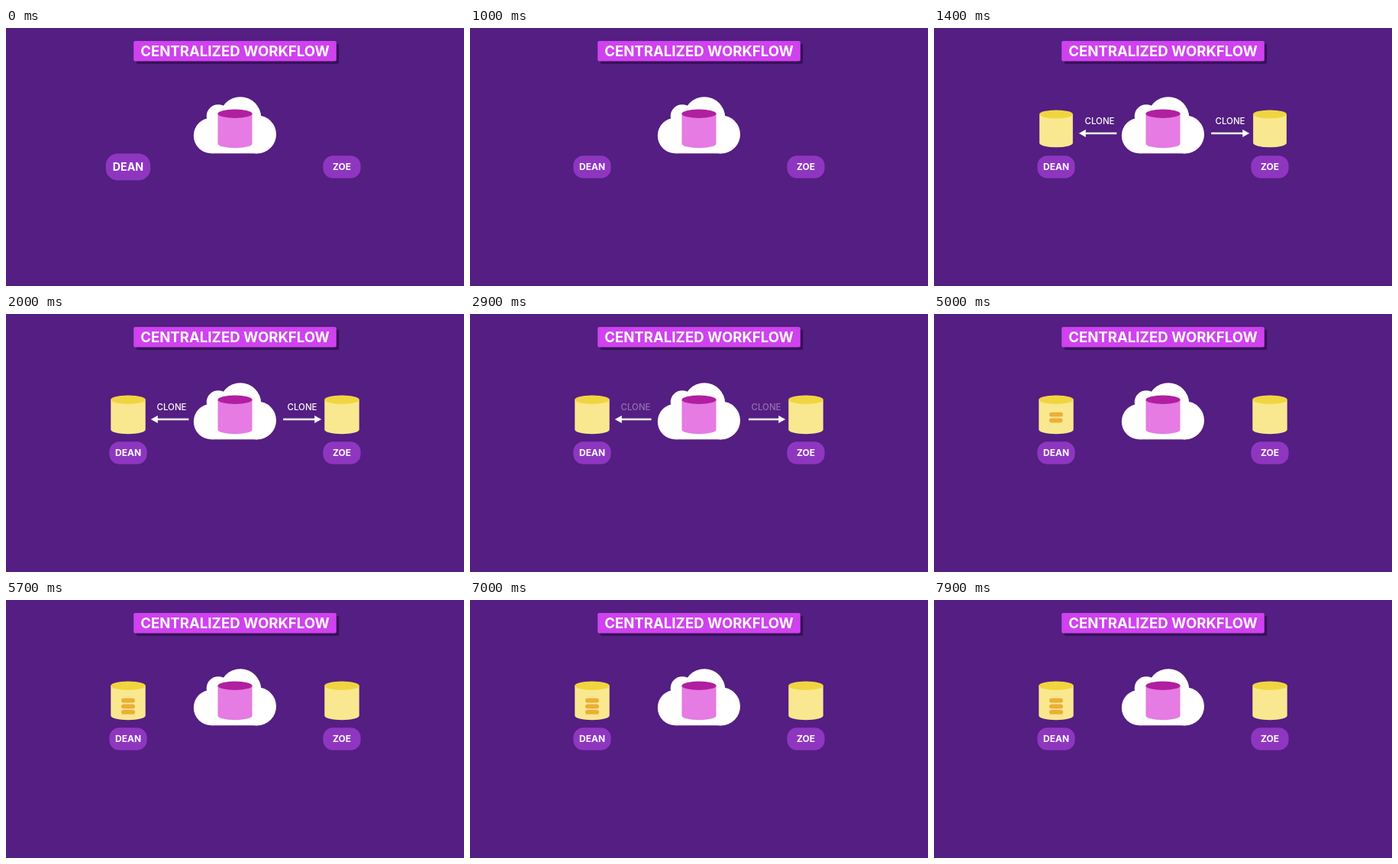
Animation of 600x338 px, one loop 8000 ms. Source, as an HTML page:

```html
<!DOCTYPE html>
<html lang="en">
<head>
<meta charset="utf-8">
<title>Centralized workflow</title>
<style>
  html, body { margin: 0; width: 100%; height: 100%; overflow: hidden; background: #541e82; }
  svg { display: block; width: 100vw; height: 100vh; }
  text { font-family: Inter, "Open Sans", sans-serif; fill: #fff; text-anchor: middle; }
  .title { font-size: 18.6px; font-weight: 700; }
  .name { font-size: 12px; font-weight: 700; }
  .label { font-size: 11.5px; font-weight: 500; }
</style>
</head>
<body>
<svg id="stage" viewBox="0 0 600 338"></svg>
<script>
const LOOP = 8000;
const stage = document.getElementById('stage');

const clamp = v => Math.min(1, Math.max(0, v));
const span = (t, start, end) => clamp((t - start) / (end - start));
const easeOut = p => 1 - (1 - p) ** 3;
const easeInOut = p => p * p * (3 - 2 * p);
const lerp = (a, b, p) => a + (b - a) * p;
const pulse = (t, start, length) => 1 + 0.37 * Math.sin(Math.PI * span(t, start, start + length)) ** 2;
const scaleAt = (x, y, s) => `translate(${x} ${y}) scale(${s}) translate(${-x} ${-y})`;

function cylinder(x, half, body, top) {
  return `<path fill="${body}" d="M${x - half} 112.3V151.5A${half} 5.7 0 0 0 ${x + half} 151.5V112.3Z"/>
    <ellipse cx="${x}" cy="112.3" rx="${half}" ry="5.7" fill="${top}"/>`;
}

const clone = (id, x) => `<g id="${id}Store">${cylinder(x, 22.7, '#f9e88f', '#f0d541')}</g>`;

const badge = (id, x, name) => `<g id="${id}Badge">
  <rect x="${x - 24.6}" y="167.2" width="49.2" height="29.6" rx="13" fill="#8e36c0"/>
  <text class="name" x="${x}" y="186.4">${name}</text></g>`;

const bar = i => `<rect class="bar" x="151" y="${128.8 + i * 7.6}" width="18" height="5.8" rx="2.9" fill="#ecae38"/>`;

stage.innerHTML = `
  <rect width="600" height="338" fill="#541e82"/>
  <rect x="170.8" y="20.6" width="265.4" height="26.4" rx="2" fill="#371158"/>
  <rect x="167.2" y="17" width="265.6" height="26.4" rx="2" fill="#cf42ee"/>
  <text class="title" x="300" y="37">CENTRALIZED WORKFLOW</text>
  <g fill="#fff">
    <circle cx="269" cy="141" r="23.2"/>
    <circle cx="329" cy="139.4" r="25"/>
    <circle cx="307" cy="117.5" r="27.3"/>
    <circle cx="278" cy="115.5" r="15.3"/>
    <rect x="269" y="118" width="60" height="46.3"/>
  </g>
  ${cylinder(300, 22.5, '#e57be3', '#b01fa0')}
  ${clone('left', 160)}${clone('right', 440)}
  ${[0, 1, 2].map(bar).join('')}
  <path id="leftArrow" fill="#fff"/><path id="rightArrow" fill="#fff"/>
  <g id="labels">
    <text class="label" x="217" y="126">CLONE</text>
    <text class="label" x="388" y="126">CLONE</text>
  </g>
  ${badge('left', 160, 'DEAN')}${badge('right', 440, 'ZOE')}`;

const part = id => document.getElementById(id);
const bars = [...document.querySelectorAll('.bar')];

function arrowPath(tail, tip) {
  const y = 138, length = Math.abs(tip - tail);
  if (length < 0.1) return '';
  const head = Math.min(9, length), wing = 5 * head / 9;
  const neck = tip - Math.sign(tip - tail) * head;
  return `M${tail} ${y - 1.2}H${neck}V${y - wing}L${tip} ${y}L${neck} ${y + wing}V${y + 1.2}H${tail}Z`;
}

function render(t) {
  part('leftBadge').setAttribute('transform', scaleAt(160, 182, pulse(t, -150, 600)));
  part('rightBadge').setAttribute('transform', scaleAt(440, 182, pulse(t, 350, 600)));

  const grow = easeOut(span(t, 1100, 1550));
  part('leftStore').setAttribute('transform', scaleAt(160, 131.8, grow));
  part('rightStore').setAttribute('transform', scaleAt(440, 131.8, grow));

  const reach = easeOut(span(t, 1030, 1380));
  const retract = easeInOut(span(t, 2850, 3300));
  const drawArrow = (id, from, to) =>
    part(id).setAttribute('d', arrowPath(lerp(from, to, retract), lerp(from, to, reach)));
  drawArrow('leftArrow', 239.3, 189.8);
  drawArrow('rightArrow', 363.2, 413.2);

  part('labels').setAttribute('opacity', span(t, 1050, 1350) * (1 - span(t, 2750, 2990)));

  bars.forEach((el, i) => {
    const start = 4600 + i * 200;
    el.setAttribute('width', 18 * easeOut(span(t, start, start + 300)));
  });
}

const begin = performance.now();
function tick() {
  render((performance.now() - begin) % LOOP);
  requestAnimationFrame(tick);
}
render(0);
requestAnimationFrame(tick);
</script>
</body>
</html>
```
